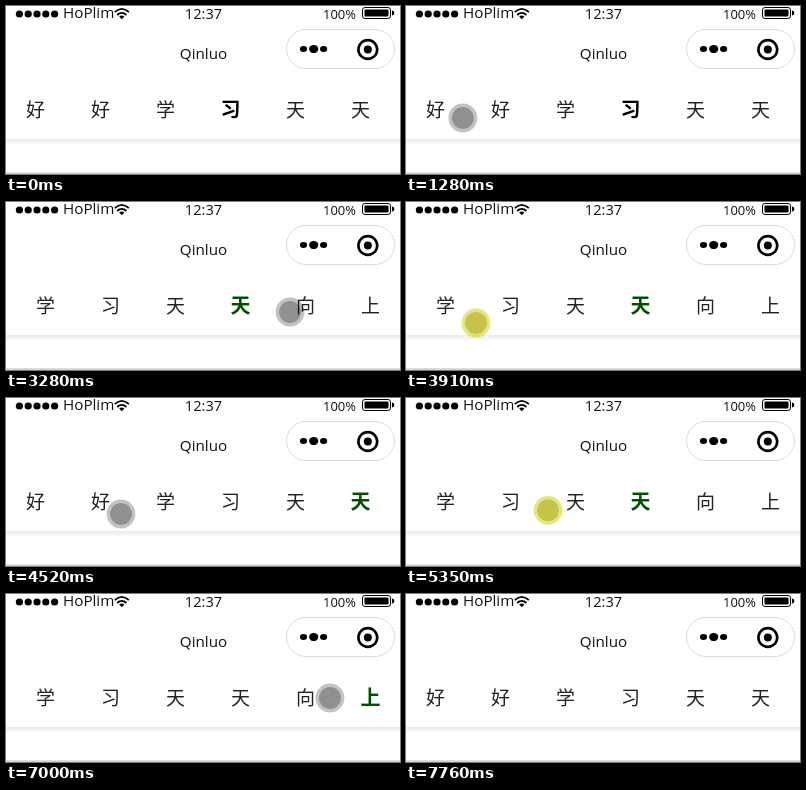
An HTML page that plays this animation: 394 px wide and 168 px high, repeating every 8.29 s.

```html
<!DOCTYPE html>
<html lang="zh">
<head>
<meta charset="utf-8">
<title>Scrolling tabs</title>
<style>
  html, body { margin: 0; width: 100%; height: 100%; overflow: hidden; background: #fff; }
  svg { display: block; width: 100%; height: 100%; }
  text { font-family: "Open Sans", "Noto Sans", sans-serif; fill: #111; }
  .tab { font: 300 19px "Noto Sans CJK SC", "Noto Sans CJK", sans-serif; text-anchor: middle; fill: #222; }
  .tab.on { font-weight: 700; font-size: 20px; fill: #005000; }
  .tab.first { fill: #000; }
</style>
</head>
<body>
<svg viewBox="0 0 394 168">
  <defs>
    <linearGradient id="shade" x1="0" y1="0" x2="0" y2="1">
      <stop offset="0" stop-color="#e9e9e9"/>
      <stop offset="1" stop-color="#fff"/>
    </linearGradient>
  </defs>
  <rect width="394" height="168" fill="#fff"/>

  <!-- status bar -->
  <g id="signal"></g>
  <text x="57" y="12.3" font-size="15.2">HoPlim</text>
  <g fill="none" stroke="#000" stroke-width="1.8">
    <path d="M108.7 6.2Q115.8 -0.4 122.9 6.2"/>
    <path d="M111.2 9Q115.8 4.8 120.4 9"/>
  </g>
  <path d="M113.2 10.6Q115.8 8.6 118.4 10.6L115.8 13.2Z"/>
  <text x="197.5" y="13" font-size="14.6" text-anchor="middle">12:37</text>
  <text x="317" y="12.5" font-size="13">100%</text>
  <rect x="356.5" y="1.5" width="28" height="11" rx="2.5" fill="none" stroke="#000"/>
  <rect x="358.5" y="3.5" width="24" height="7" rx="1"/>
  <path d="M386 4.5Q388.4 4.8 388.4 7T386 9.5Z"/>

  <!-- title bar -->
  <text x="197.5" y="53" font-size="15.2" text-anchor="middle">Qinluo</text>
  <rect x="280.5" y="23.5" width="108" height="39" rx="19.5" fill="#fff" stroke="#dcdcdc"/>
  <ellipse cx="297.5" cy="43" rx="3.6" ry="2.9"/>
  <ellipse cx="307.7" cy="43" rx="4.6" ry="4.1"/>
  <ellipse cx="317.6" cy="43" rx="3.6" ry="2.9"/>
  <circle cx="361.8" cy="43.5" r="9.4" fill="none" stroke="#000" stroke-width="2.6"/>
  <circle cx="361.8" cy="43.5" r="4"/>

  <rect y="133" width="394" height="6" fill="url(#shade)"/>
  <g id="tabs"></g>
  <rect y="166.5" width="394" height="1.2" fill="#bdbdbd"/>
  <g id="pointer">
    <circle r="12.7" fill="none" stroke-width="3.4"/>
    <circle r="11"/>
  </g>
</svg>
<script>
const LOOP = 8290, STEP = 70;
const FIRST_X = 29.5, GAP = 65, MAX_SCROLL = 120, TAP_Y = 105;

const move = (t, x, y) => [{ t, x, y }];
const tap = (t, x) => [{ t, x, y: TAP_Y, down: true }, { t: t + STEP, x, y: TAP_Y }];
const drag = (t, x, y, steps, toX, toY) =>
  [{ t, x, y, down: true }, { t: t + steps * STEP, x: toX, y: toY }];

// The pointer's route; tabs and scrolling follow from it.
const stops = [
  move(860, 200, 154),
  tap(1350, 33), tap(1840, 94), tap(2050, 160),
  move(2190, 246, 106),
  tap(2330, 355), drag(2400, 355, 107, 2, 235, 112),
  move(2870, 124, 74), move(3280, 284, 110), move(3770, 45, 121),
  drag(3910, 70, 121, 4, 372, 114),
  move(4520, 115, 116), move(5010, 305, 113),
  drag(5210, 280, 113, 3, 73, 112),
  move(5970, 100, 82),
  tap(6530, 361),
  move(7000, 324, 104),
  drag(7210, 150, 116, 3, 365, 126),
  move(7690, 327, 130)
].flat();

const NS = "http://www.w3.org/2000/svg";
const byId = id => document.getElementById(id);
const clamp = (v, low, high) => Math.min(Math.max(v, low), high);
const mix = (a, b, k) => a + (b - a) * k;

function add(parent, name, attrs) {
  const el = parent.appendChild(document.createElementNS(NS, name));
  for (const key in attrs) el.setAttribute(key, attrs[key]);
  return el;
}

for (let i = 0; i < 5; i++) add(byId("signal"), "circle", { cx: 13.4 + 8.8 * i, cy: 8, r: 3.6 });

const strip = byId("tabs");
const tabs = [..."好好学习天天向上"].map((char, i) => {
  const el = add(strip, "text", { x: FIRST_X + GAP * i, y: 111 });
  el.textContent = char;
  return el;
});
const pointer = byId("pointer");
const [ring, disc] = pointer.children;

// A press in place picks a tab, a moving press scrolls the strip.
function stateAt(t) {
  const state = { x: 0, y: 0, scroll: 0, chosen: 3, touched: false, pressed: false };
  stops.forEach((a, i) => {
    if (a.t > t) return;
    const b = stops[i + 1] || { ...a, t: a.t + STEP };
    const held = Math.floor((t - a.t) / STEP) * STEP;
    const k = t >= b.t ? 1 : held / (b.t - a.t);
    state.x = mix(a.x, b.x, k);
    state.y = mix(a.y, b.y, k);
    state.pressed = Boolean(a.down);
    if (!a.down) return;
    if (a.x === b.x) {
      state.chosen = Math.round((a.x + state.scroll - FIRST_X) / GAP);
      state.touched = true;
    } else {
      state.scroll = clamp(state.scroll + a.x - state.x, 0, MAX_SCROLL);
    }
  });
  return state;
}

function draw(time) {
  const t = time % LOOP;
  const { x, y, scroll, chosen, touched, pressed } = stateAt(t);
  tabs.forEach((el, i) => {
    el.setAttribute("class", i !== chosen ? "tab" : touched ? "tab on" : "tab on first");
  });
  strip.setAttribute("transform", `translate(${-scroll} 0)`);

  const shown = t >= stops[0].t && t < stops[stops.length - 1].t + STEP;
  pointer.setAttribute("visibility", shown ? "visible" : "hidden");
  pointer.setAttribute("transform", `translate(${x} ${y})`);
  ring.setAttribute("stroke", pressed ? "rgba(205,205,0,.5)" : "rgba(0,0,0,.24)");
  disc.setAttribute("fill", pressed ? "rgba(175,170,0,.71)" : "rgba(20,20,20,.47)");
}

const start = performance.now();
function frame() {
  draw(performance.now() - start);
  requestAnimationFrame(frame);
}
frame();
</script>
</body>
</html>
```
